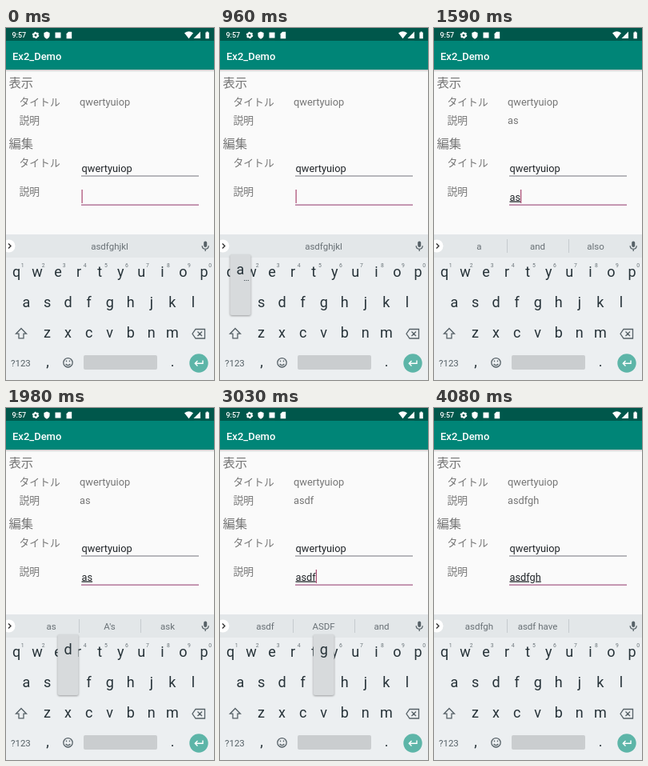
Animation of 260 by 440 pixels, one loop 4530 ms. Source, as an HTML page:

```html
<!DOCTYPE html>
<html lang="ja">
<head>
<meta charset="utf-8">
<title>Typing into a bound form</title>
<style>
  html, body { margin: 0; width: 100%; height: 100%; overflow: hidden; background: #fafafa; }
  svg { display: block; width: 260px; height: 440px; }
  text { font-family: Roboto, sans-serif; white-space: pre; }
  .jp { font-family: "Noto Sans CJK JP", "Noto Sans CJK", sans-serif; fill: #757575; }
  .label { font-size: 12.8px; }
  .head { font-size: 15.3px; }
  .value { font-size: 12.8px; fill: #757575; }
  .edit { font-size: 12.8px; fill: #212529; }
  .typed { text-decoration: underline; text-decoration-thickness: 1px; }
  .key { font-size: 18px; fill: #263238; text-anchor: middle; }
  .hint { font-size: 6.8px; fill: #6b757a; text-anchor: middle; }
  .word { font-size: 11.5px; fill: #687075; text-anchor: middle; }
  .icon { fill: none; stroke: #566167; stroke-width: 1.3; }
  .popup { filter: drop-shadow(0 1px 1.2px rgba(0, 0, 0, .35)); }
</style>
</head>
<body>
<svg viewBox="0 0 260 440">
  <defs>
    <linearGradient id="shade" x2="0" y2="1">
      <stop stop-color="#000" stop-opacity=".22"/>
      <stop offset="1" stop-color="#000" stop-opacity="0"/>
    </linearGradient>
  </defs>
  <rect width="260" height="440" fill="#fafafa"/>

  <!-- Status and title bars -->
  <rect width="260" height="16" fill="#00574b"/>
  <rect y="16" width="260" height="36" fill="#008577"/>
  <rect y="52" width="260" height="3" fill="url(#shade)"/>
  <g fill="#fff">
    <text x="7.5" y="12" font-size="9" font-weight="500">9:57</text>
    <circle cx="37" cy="9" r="2.5" fill="none" stroke="#fff" stroke-width="2"/>
    <circle cx="37" cy="9" r="3.7" fill="none" stroke="#fff" stroke-width="1.2" stroke-dasharray="1.94"/>
    <path d="M51 4.5l3.6 1.5v3q0 3-3.6 4.7q-3.6-1.7-3.6-4.7v-3z"/>
    <rect x="61.5" y="5.5" width="7" height="7"/>
    <path d="M78 4.8h4.2v8.4h-6.6v-6z"/>
    <path d="M223 6.2q5.5-3.8 11 0l-5.5 7z"/>
    <path d="M243 4.5v8.5h-8.5z"/>
    <path d="M249.4 5.5h1.2v-1h2v1h1.2v7.7h-4.4z"/>
    <text x="8" y="39.5" font-size="13" font-weight="500">Ex2_Demo</text>
  </g>

  <!-- Form -->
  <text class="jp head" x="3.5" y="74">表示</text>
  <text class="jp label" x="16.5" y="97">タイトル</text>
  <text class="jp label" x="16.5" y="119.7">説明</text>
  <text class="jp head" x="3.5" y="150">編集</text>
  <text class="jp label" x="16.5" y="173">タイトル</text>
  <text class="jp label" x="16.5" y="209">説明</text>
  <text class="value" x="92" y="97">qwertyuiop</text>
  <text class="value" id="shown" x="92" y="119.5"></text>
  <text class="edit" x="94.5" y="179.5">qwertyuiop</text>
  <text class="edit typed" id="typed" x="94.5" y="215.5"></text>
  <rect x="94" y="184.5" width="147" height="1" fill="#77777f"/>
  <rect x="94" y="220.5" width="147" height="1.3" fill="#a9638c"/>
  <rect id="cursor" y="202" width="1.2" height="17" fill="#a8476f"/>

  <!-- Keyboard -->
  <rect y="258" width="260" height="182" fill="#eceff1"/>
  <rect y="258" width="260" height="29" fill="#e3e7e9"/>
  <circle cx="3.5" cy="272.5" r="8" fill="#fff"/>
  <path d="M3 269.5l3 3l-3 3" fill="none" stroke="#333" stroke-width="1.4"/>
  <g id="dividers" fill="#c6cbce">
    <rect x="91" y="264" width="1" height="17"/>
    <rect x="168" y="264" width="1" height="17"/>
  </g>
  <text class="word" x="56.5" y="277"></text>
  <text class="word" x="129.5" y="277"></text>
  <text class="word" x="202" y="277"></text>
  <rect x="247.2" y="266.5" width="4" height="7.5" rx="2" fill="#566167"/>
  <path class="icon" d="M245.2 272.3q0 4 4 4t4-4M249.2 276.3v2.7"/>
  <g id="keys"></g>
  <path class="icon" d="M19 375.5l6.5 6.7h-3.5v5.6h-6v-5.6h-3.5z"/>
  <path class="icon" d="M237 376.5h11.5v11.5h-11.5l-4-5.75zM239.5 379.5l5.5 5.5m0-5.5l-5.5 5.5"/>
  <text x="6" y="422.7" font-size="11.5" fill="#566167">?123</text>
  <text class="key" x="52" y="423" font-size="16">,</text>
  <text class="key" x="208" y="423" font-size="16">.</text>
  <circle class="icon" cx="77.5" cy="418.3" r="5.7"/>
  <path class="icon" d="M74.6 420q2.9 3.2 5.8 0M75.5 415.6v1.6M79.5 415.6v1.6"/>
  <rect x="97" y="409" width="92" height="18" rx="2" fill="#cacdcf"/>
  <circle cx="241" cy="419" r="11.7" fill="#5db5a8"/>
  <path d="M246 415.5v3.7h-9.5M239.5 416l-3.2 3.2l3.2 3.2" fill="none" stroke="#fff" stroke-width="1.4"/>
  <g id="popup" class="popup">
    <rect x="-13" y="283" width="26" height="76" rx="2.5" fill="#d7dadc"/>
    <text class="key" y="307.5"></text>
    <path id="more" d="M4.5 315.5h6" stroke="#4c565b" stroke-width="1.2" stroke-dasharray="1.2"/>
  </g>
</svg>
<script>
  const LOOP = 4530, STEP = 26.05;
  const $ = selector => document.querySelector(selector);
  const keyX = (first, i) => first + i * STEP;

  const rows = [["qwertyuiop", 13, 311], ["asdfghjkl", 25.5, 348.5], ["zxcvbnm", 51.5, 386.5]];
  const label = (type, x, y, text) => `<text class="${type}" x="${x}" y="${y}">${text}</text>`;
  $("#keys").innerHTML = rows.map(([letters, first, y], row) =>
    [...letters].map((letter, i) => {
      const x = keyX(first, i);
      return label("key", x, y, letter) + (row ? "" : label("hint", x + 7.6, 299, (i + 1) % 10));
    }).join("")).join("");

  // Times in ms: key down, text entered, suggestions refreshed.
  const presses = [
    { key: "a", down: 960, enter: 1050, settle: 1140, words: ["a", "and", "also"] },
    { key: "s", down: 1410, enter: 1500, settle: 1650, words: ["as", "A's", "ask"] },
    { key: "d", down: 1980, enter: 2070, settle: 2190, words: ["asd", "and", "ASD"] },
    { key: "f", down: 2490, enter: 2580, settle: 2700, words: ["asdf", "ASDF", "and"] },
    { key: "g", down: 2970, enter: 3060, settle: 3150, words: ["asdfg", "ASDF", ""] },
    { key: "h", down: 3540, enter: 3600, settle: 3750, words: ["asdfgh", "asdf have", ""] }
  ];
  const POPUP_LINGER = 60, BLINK = 480;

  const wordSlots = document.querySelectorAll(".word");
  const setText = (node, text) => { if (node.textContent !== text) node.textContent = text; };
  const show = (node, on) => node.setAttribute("visibility", on ? "visible" : "hidden");

  function cursorOn(t, last) {
    return last ? t < last.enter + BLINK : t < 150 || t >= 630;
  }

  function render(t) {
    const entered = presses.filter(p => t >= p.enter);
    const last = entered[entered.length - 1];
    const text = entered.map(p => p.key).join("");
    setText($("#shown"), text);
    setText($("#typed"), text);

    const width = text ? $("#typed").getComputedTextLength() : 0;
    $("#cursor").setAttribute("x", 94.5 + width);
    show($("#cursor"), cursorOn(t, last));

    const settled = presses.filter(p => t >= p.settle).pop();
    const words = settled ? settled.words : ["", "asdfghjkl", ""];
    wordSlots.forEach((slot, i) => setText(slot, words[i]));
    show($("#dividers"), settled);

    const held = presses.find(p => t >= p.down && t < p.enter + POPUP_LINGER);
    show($("#popup"), held);
    show($("#more"), held && "as".includes(held.key));
    if (held) {
      const x = keyX(rows[1][1], rows[1][0].indexOf(held.key));
      $("#popup").setAttribute("transform", `translate(${x} 0)`);
      setText($("#popup text"), held.key);
    }
  }

  const start = performance.now();
  function tick() {
    render((performance.now() - start) % LOOP);
    requestAnimationFrame(tick);
  }
  tick();
</script>
</body>
</html>
```
